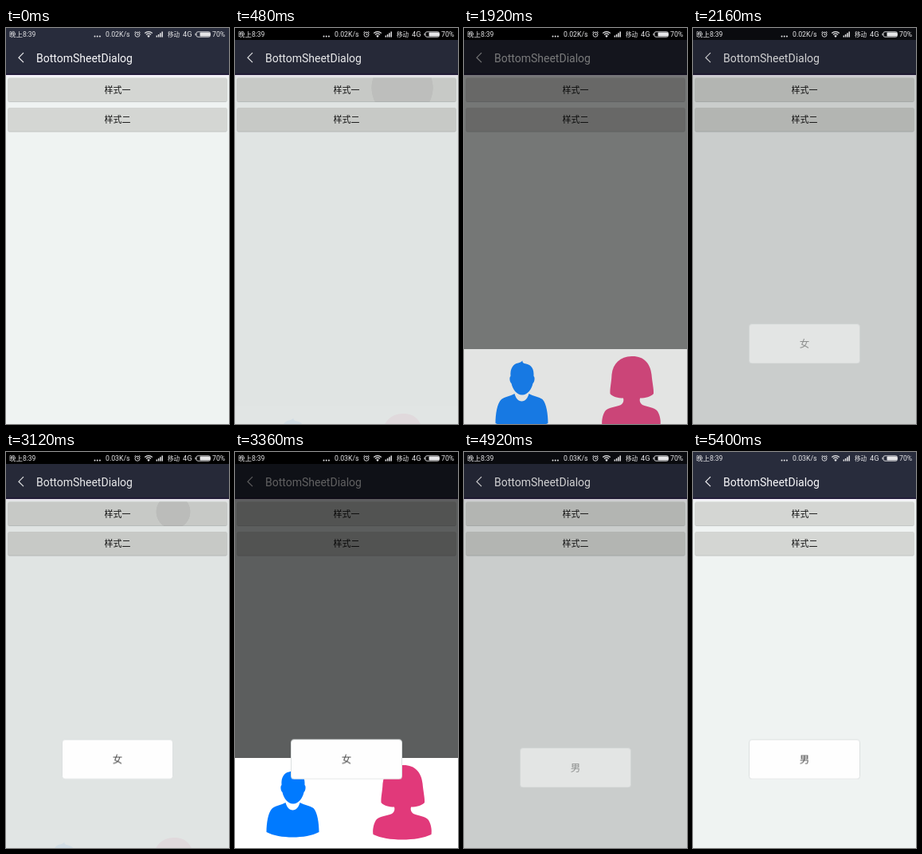
Animation, 280 px wide and 497 px high, one loop 5.64 s. Source, as an HTML page:

```html
<!DOCTYPE html>
<html lang="zh">
<head>
<meta charset="utf-8">
<title>BottomSheetDialog</title>
<style>
html, body { margin: 0; width: 100%; height: 100%; overflow: hidden; background: #eff3f2; }
svg { display: block; width: 100%; height: 100%; }
text { font-family: Roboto, "Noto Sans CJK SC", "Noto Sans CJK", sans-serif; }
.mid { text-anchor: middle; }
.label { font-size: 11px; fill: #141414; }
.status text { font-size: 8.7px; fill: #e6e6e8; }
.line { fill: none; stroke: #e6e6e8; }

/* One step lasts 120 ms: 1/47 of the loop. */
.dim, .sheet, .first, .second, .ripple, .bar, .slow, .fast {
  animation: 5640ms step-end infinite;
}
.dim { animation-name: dim; }
.sheet { animation-name: sheet; }
.first { animation-name: first; }
.second { animation-name: second; }
.ripple { animation-name: ripple; }
.bar { animation-name: bar; }
.slow { animation-name: slow; }
.fast { animation-name: fast; }

@keyframes dim {
  0% { opacity: 0; }
  8.51% { opacity: .063; }
  10.638% { opacity: .36; }
  12.765% { opacity: .61; }
  31.914% { opacity: .59; }
  34.042% { opacity: .51; }
  36.17% { opacity: .33; }
  38.297% { opacity: .155; }
  40.425% { opacity: 0; }
  55.319% { opacity: .063; }
  57.446% { opacity: .36; }
  59.574% { opacity: .61; }
  80.851% { opacity: .59; }
  82.978% { opacity: .51; }
  85.106% { opacity: .33; }
  87.234% { opacity: .155; }
  89.361%, 100% { opacity: 0; }
}
@keyframes sheet {
  0% { opacity: 0; transform: translateY(96px); }
  8.51% { opacity: .06; transform: translateY(91px); }
  10.638% { opacity: .6; transform: translateY(38px); }
  12.765% { opacity: 1; transform: none; }
  31.914% { opacity: .98; transform: translateY(2px); }
  34.042% { opacity: .8; transform: translateY(19px); }
  36.17% { opacity: .35; transform: translateY(62px); }
  38.297% { opacity: 0; transform: translateY(96px); }
  55.319% { opacity: .06; transform: translateY(91px); }
  57.446% { opacity: .6; transform: translateY(38px); }
  59.574% { opacity: 1; transform: none; }
  80.851% { opacity: .98; transform: translateY(2px); }
  82.978% { opacity: .8; transform: translateY(19px); }
  85.106% { opacity: .35; transform: translateY(62px); }
  87.234%, 100% { opacity: 0; transform: translateY(96px); }
}
@keyframes first {
  0% { opacity: 0; transform: translateY(10.5px); }
  38.297% { opacity: .48; transform: translateY(10.5px); }
  40.425% { opacity: 1; transform: none; }
  78.723% { opacity: .55; transform: translateY(4px); }
  80.851% { opacity: .15; transform: translateY(10.5px); }
  82.978%, 100% { opacity: 0; transform: none; }
}
@keyframes second {
  0% { opacity: 0; transform: translateY(10.5px); }
  87.234% { opacity: .48; transform: translateY(10.5px); }
  89.361%, 100% { opacity: 1; transform: none; }
}
@keyframes ripple {
  0% { opacity: 0; transform: scale(.3); }
  2.127% { opacity: 1; transform: scale(.5); }
  4.255% { opacity: 1; transform: scale(1); }
  8.51% { opacity: .8; transform: scale(1.8); }
  10.638% { opacity: .4; transform: scale(4); }
  12.765% { opacity: 0; transform: scale(.3); }
  51.063% { opacity: 1; transform: scale(.3); }
  53.191% { opacity: 1; transform: scale(.65); }
  55.319% { opacity: 1; transform: scale(1); }
  57.446% { opacity: .5; transform: scale(3); }
  59.574%, 100% { opacity: 0; transform: scale(.3); }
}
@keyframes bar {
  0% { opacity: 0; }
  4.255% { opacity: 1; }
  38.297% { opacity: .75; }
  40.425% { opacity: 0; }
  53.191% { opacity: 1; }
  87.234% { opacity: .75; }
  89.361%, 100% { opacity: 0; }
}
@keyframes slow {
  0% { opacity: 1; }
  46.808%, 100% { opacity: 0; }
}
@keyframes fast {
  0% { opacity: 0; }
  46.808%, 100% { opacity: 1; }
}
</style>
</head>
<body>
<svg viewBox="0 0 280 497">
  <defs>
    <clipPath id="button-clip"><rect x="2.5" y="62.5" width="275" height="30" rx="1.5"/></clipPath>
    <g id="button">
      <rect x="2" y="1.5" width="276" height="29.7" rx="2" fill="#000" opacity=".05"/>
      <rect x="2.5" y="1" width="275" height="29.9" rx="2" fill="#000" opacity=".14"/>
      <rect x="2.5" y=".5" width="275" height="29.5" rx="1.5" fill="#d4d6d3"/>
    </g>
    <rect id="toast" x="70.5" y="361" width="139" height="49.5" rx="3.5" fill="#fefefe" stroke="#dce0e0"/>
  </defs>

  <rect width="280" height="497" fill="#eff3f2"/>
  <rect y="59" width="280" height="2" fill="#f4f1f9"/>
  <rect width="280" height="59" fill="#282c3c"/>
  <rect y="57" width="280" height="2" fill="#231e3a"/>
  <path d="M22 31.2 16 37.2 22 43.2" fill="none" stroke="#f2f2f4" stroke-width="1.2"/>
  <text x="38" y="42.7" font-size="14" fill="#f8f8fa">BottomSheetDialog</text>

  <use href="#button" y="62"/>
  <use href="#button" y="99.5"/>
  <g clip-path="url(#button-clip)">
    <g transform="translate(210 75)"><circle class="ripple" r="21.5" fill="#000" fill-opacity=".06"/></g>
  </g>
  <text class="mid label" x="140" y="81.7">样式一</text>
  <text class="mid label" x="140" y="119.2">样式二</text>

  <rect class="dim" y="15" width="280" height="482"/>

  <g class="sheet">
    <rect y="384" width="280" height="210" fill="#fff"/>
    <g fill="#007aff">
      <path d="M73.5 398.5C73 401 75 402 78 402.5C85 404 88 409 87.5 418C89.5 419 88.5 426 86.5 427C85 434 80 441.5 73 441.5C66 441.5 61 434 59.5 427C57.5 426 56.5 419 58.5 418C57.5 408 62 402.5 68 401.5C70 401 72 400 73.5 398.5Z"/>
      <path d="M63.5 440C65 445.5 68 449.5 72.5 449.5C77 449.5 80 445.5 81.5 440C87 443 94 444 98.5 447C103.5 452 105.5 466 105.5 477C97 481.5 85 483.5 72.5 483.5C60 483.5 48 481.5 39.5 477C39.5 466 41.5 452 47 447C51 444 58 443 63.5 440Z"/>
    </g>
    <path fill="#e1397a" d="M210.5 393C226 392.5 234 402 235.5 416C236.5 427 238.5 434 238 440C234 444 228 445.5 221 445.5C220 449 221 452 224 454C231 457 239 457 243 462C246 467 247.5 474 246.5 480C237 484.5 224 486.5 210 486.5C196 486.5 183 484.5 173.5 480C172.5 474 174 467 177 462C181 457 190 457 197 454C200 452 201 449 200 445.5C193 445.5 187 444 183.5 440C183 433 185 427 185.5 416C187 402 196 393.5 210.5 393Z"/>
  </g>

  <g class="first">
    <use href="#toast"/>
    <text class="mid" x="140" y="390.3" font-size="12.5" fill="#4c4c4c">女</text>
  </g>
  <g class="second">
    <use href="#toast"/>
    <text class="mid" x="140" y="390.3" font-size="12.5" fill="#4c4c4c">男</text>
  </g>

  <rect class="bar" width="280" height="15"/>
  <g class="status">
    <text x="4" y="11.2" style="font-size:8.5px">晚上8:39</text>
    <g fill="#e6e6e8">
      <circle cx="111.5" cy="10.5" r="1"/>
      <circle cx="114.7" cy="10.5" r="1"/>
      <circle cx="117.9" cy="10.5" r="1"/>
    </g>
    <text class="slow" x="125" y="11.2">0.02K/s</text>
    <text class="fast" x="125" y="11.2">0.03K/s</text>
    <g class="line" stroke-width=".9">
      <circle cx="165" cy="8.2" r="3"/>
      <path d="M165 6.5V8.4H166.5M161.4 5.7 163 4.3M168.6 5.7 167 4.3"/>
      <path d="M174.2 6.5Q179 2.6 183.8 6.5M175.9 8.4Q179 5.8 182.1 8.4" stroke-width="1.2"/>
    </g>
    <path fill="#e6e6e8" d="M177.2 9.8Q179 8.3 180.8 9.8L179 11.9Z"/>
    <path class="line" stroke-width="1.5" d="M189.3 11.5V9.5M191.6 11.5V8M193.9 11.5V6.3M196.2 11.5V4.5"/>
    <text x="203" y="11" style="font-size:7.5px">移动</text>
    <text x="222" y="11.2" style="font-size:9.2px">4G</text>
    <rect class="line" x="239" y="4.8" width="17.5" height="6.4" rx="2" stroke-width=".9"/>
    <rect x="243.5" y="5.5" width="12.5" height="5" rx="1" fill="#e6e6e8"/>
    <rect x="237.5" y="6.7" width="1" height="2.6" fill="#e6e6e8"/>
    <text x="259" y="11.2">70%</text>
  </g>
</svg>
</body>
</html>
```
